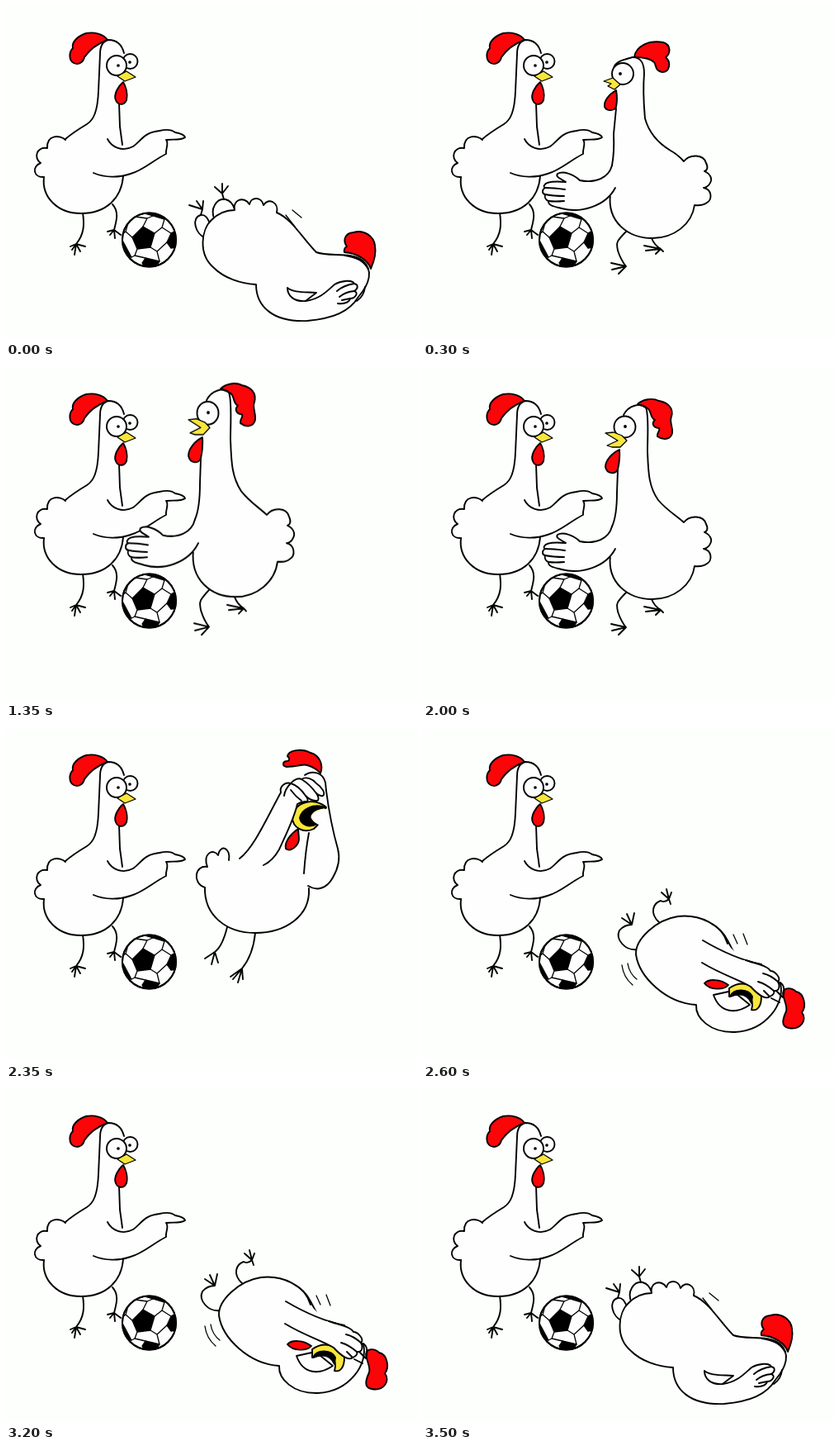
An HTML page without scripts for the animation above (3.55 s loop, 498 px wide and 403 px high).

```html
<!DOCTYPE html>
<html lang="en">
<head>
<meta charset="utf-8">
<title>Chickens and ball</title>
<style>
  html, body { margin: 0; width: 100%; height: 100%; overflow: hidden; background: #fdfffd; }
  svg { display: block; width: 100vw; height: 100vh; }
  path, circle { fill: none; stroke: #000; stroke-width: 1.9; stroke-linecap: round; stroke-linejoin: round; }
  .skin { fill: #fdfefd; }
  .plain { fill: #fdfefd; stroke: none; }
  .red { fill: #fb0509; }
  .yellow { fill: #f8e63c; }
  .black { fill: #000; }
  .thin { stroke-width: 1.3; }

  /* Poses switch like a flipbook */
  .pose { visibility: hidden; animation: 3.55s step-end infinite; }
  .stand { animation-name: stand; }
  .calm { animation-name: calm; }
  .talk { animation-name: talk; }
  .wail { animation-name: wail; }
  .roll-front { animation-name: roll-front; }
  .roll-back { animation-name: roll-back; }
  .stretch { transform-origin: 0 323px; animation: stretch 3.55s step-end infinite; }
  @keyframes stand { 0% { visibility: hidden } 5.63% { visibility: visible } 63.38%, 100% { visibility: hidden } }
  @keyframes calm {
    0% { visibility: hidden } 5.63% { visibility: visible } 35.21% { visibility: hidden }
    43.66% { visibility: visible } 52.11%, 100% { visibility: hidden }
  }
  @keyframes talk {
    0% { visibility: hidden } 35.21% { visibility: visible } 43.66% { visibility: hidden }
    52.11% { visibility: visible } 63.38%, 100% { visibility: hidden }
  }
  @keyframes stretch { 0% { transform: none } 35.21% { transform: scaleY(1.067) } 43.66%, 100% { transform: none } }
  @keyframes wail { 0% { visibility: hidden } 63.38% { visibility: visible } 70.42%, 100% { visibility: hidden } }
  @keyframes roll-front {
    0% { visibility: hidden } 70.42% { visibility: visible } 78.87% { visibility: hidden }
    87.32% { visibility: visible } 95.77%, 100% { visibility: hidden }
  }
  @keyframes roll-back {
    0% { visibility: visible } 5.63% { visibility: hidden } 78.87% { visibility: visible }
    87.32% { visibility: hidden } 95.77%, 100% { visibility: visible }
  }
</style>
</head>
<body>
<svg viewBox="0 0 498 403" preserveAspectRatio="none">
  <defs><clipPath id="round"><circle cx="173.500" cy="283" r="33"/></clipPath></defs>

  <g id="pointer">
    <path d="M93 250C95 264 95 276 85 288L78 291M85 288L80 295M85 288L83 301M85 288L90 297M85 288L96 291"/>
    <path d="M129 240C138 250 133 262 131 271L123 273M131 271L126 277M131 271L132 281M131 271L139 277"/>
    <path class="red" d="M123 41C118 34 107 31 97 33C87 36 79 44 81 51C76 56 76 66 82 69C89 72 94 67 95 62C101 53 110 46 123 41Z"/>
    <path class="plain" d="M114 52C117 40 137 36 143 56L138 117L142 208C140 232 120 251 91 251C62 251 45 228 46 207L72 158C105 143 112 130 112 105Z"/>
    <path d="M143 57C140 45 133 41 124 41C116 43 114 50 114 58L112 103C111 128 106 138 98 143C88 149 80 154 72 161"/>
    <path d="M137 117L138 146L141 168M142 206C140 232 122 251 91 251C62 251 43 231 46 207"/>
    <path class="skin" d="M72 162C66 156 49 155 50 172C37 170 33 184 42 190C31 194 33 208 46 207"/>
    <path class="skin" d="M123 161C128 171 141 177 154 170C164 163 167 153 186 151Q199 148 205 153Q216 155 217 159C212 163 202 161 194 162C198 166 193 173 194 179C178 187 166 199 151 203C137 208 120 208 106 202"/>
    <circle class="skin" cx="150.500" cy="67" r="9"/>
    <circle class="skin" cx="134" cy="72" r="12"/>
    <circle class="black" cx="136" cy="72" r=".9"/>
    <circle class="black" cx="150" cy="68" r=".9"/>
    <path class="yellow thin" d="M135 85L146 79L157 86L144 91Z"/>
    <path class="red" d="M142 92C136 97 130 107 133 114C136 121 143 120 146 114C148 106 145 97 142 92Z"/>
  </g>

  <g class="stretch">
    <g class="pose stand">
      <path d="M248 271C231 288 235 287 236 296Q240 308 246 315L228 311M246 315L229 319M246 315L237 324"/>
      <path d="M277 281Q280 289 288 294L268 290M288 294L270 296M288 294L282 300M288 294L291 297"/>
      <path class="skin" d="M316 188C323 179 340 179 343 190C346 196 344 199 341 200C348 203 351 209 348 214C346 219 341 220 340 220C350 222 351 234 344 238Q339 242 329 241C326 264 304 281 278 281C248 281 223 261 227 228"/>
      <path class="plain" d="M234 120L229 195L227 230L329 240L337 210L316 187L278 155Z"/>
    </g>

    <g class="pose calm">
      <path class="red" d="M256 62C258 48 274 41 291 44C301 47 300 58 294 62C301 68 299 80 290 80C281 79 283 72 280 68C275 63 264 62 256 62Z"/>
      <path class="plain" d="M234 100L230 82C237 65 264 52 268 77L268 135L285 163L316 187L229 195Z"/>
      <path d="M254 62C266 62 268 72 268 82C266 105 268 124 269 136C275 158 290 169 300 175Q309 180 316 188"/>
      <path d="M234 124L231 155Q232 177 229 193"/>
      <path class="skin" d="M231 75C233 67 243 65 254 62"/>
      <circle class="skin" cx="242" cy="82" r="13"/>
      <circle class="black" cx="239" cy="82" r="1"/>
      <path class="yellow thin" d="M219 91L230 87L239 95L232 101L224 97L228 94Z"/>
      <path class="red" d="M234 102C225 107 219 115 220 122C223 128 232 127 234 122Q236 112 234 102Z"/>
    </g>

    <g class="pose talk">
      <path class="red" d="M260 45C266 39 278 37 286 41C297 43 304 50 301 60C298 66 303 72 302 80C300 88 291 89 284 84C283 79 288 77 286 74C278 73 277 68 281 64C275 62 277 53 272 50Z"/>
      <path class="plain" d="M238 100L233 72C237 50 270 37 273 58L273 125L285 157L316 187L229 203Z"/>
      <path d="M243 58C249 46 264 43 270 49C274 58 272 85 272 102C273 126 273 144 285 161C295 173 307 180 316 188"/>
      <path d="M236 125L235 152Q235 180 229 193"/>
      <circle class="skin" cx="244.500" cy="72.500" r="13"/>
      <circle class="black" cx="245" cy="72" r="1"/>
      <path class="yellow thin" d="M221 80L231 79L241 83L247 89L239 97L229 97L223 95L236 89Z"/>
      <path class="red" d="M238 100C229 104 221 113 221 121C223 130 233 130 236 124Q239 111 238 100Z"/>
    </g>

    <g class="pose stand">
      <path class="skin" d="M229 193C225 208 209 215 190 211C183 204 170 199 163 203C160 207 167 209 173 213C161 212 149 212 147 217C146 218 147 220 148 220C144 222 144 227 148 228C147 232 149 235 152 236C151 242 161 243 168 245C190 251 221 243 233 220"/>
      <path d="M148 220Q158 220 172 222M148 228Q158 230 171 230M152 236Q160 237 171 236"/>
    </g>
  </g>

  <g class="pose wail">
    <path d="M268 241C264 257 260 266 253 271L241 279M253 271L249 286M253 271L257 284"/>
    <path d="M302 248C300 268 295 280 286 291L272 301M286 291L275 304M286 291L281 308M286 291L287 304"/>
    <path class="red" d="M381 55C385 45 380 33 369 30C358 24 342 27 341 34C344 37 344 39 341 40C335 40 334 46 340 47C354 47 360 43 365 45C372 47 377 50 381 55Z"/>
    <path class="plain" d="M283 158L334 76L360 55L388 63L404 155L367 195C367 226 335 248 302 248C260 246 237 221 241 193L268 155Z"/>
    <path d="M241 193C240 226 266 248 302 248C338 248 369 228 367 194"/>
    <path class="skin" d="M270 160C273 146 260 139 257 154C251 145 238 152 244 168C229 165 225 188 241 193"/>
    <path d="M362 57C370 51 384 53 387 66L388 76"/>
    <path class="yellow" d="M388 96C374 84 350 88 347 108C347 121 361 128 373 122L379 116Z"/>
    <path class="black" d="M387 96C372 91 358 98 356 109C358 118 368 121 377 116C370 113 367 109 369 105C372 99 379 97 387 96Z"/>
    <path class="plain" d="M388 98C377 98 370 103 370 108C371 112 374 115 379 117L372 130L363 190L383 194L402 158Z"/>
    <path d="M388 76C391 99 396 125 402 146C405 157 403 169 396 181C389 194 377 198 366 191M367 127Q363 148 361 176"/>
    <path class="skin" d="M283 158C300 145 314 113 333 78C331 70 339 65 345 67C349 62 355 60 358 62C364 58 372 62 376 67C382 71 388 79 384 82Q380 83 376 79C380 85 379 89 375 88Q369 88 363 82C367 87 366 90 362 89Q356 90 353 92C349 110 340 127 331 147Q323 161 312 166"/>
    <path d="M345 67Q338 74 337 82M345 67Q355 70 363 82M358 62Q368 68 376 79M345 75Q351 83 358 88"/>
    <path class="red" d="M354 122C345 128 337 138 339 146C345 151 355 142 355 134Z"/>
  </g>

  <g class="pose roll-front">
    <path d="M260 268C244 270 233 255 238 245Q244 238 253 238L241 230M253 238L247 225M253 238L256 224"/>
    <path d="M286 235C274 224 279 212 288 209Q293 212 298 207L289 199M298 207L295 195M298 207L301 199M298 207L300 213"/>
    <path class="red" d="M436 321C437 313 447 314 452 319C462 321 465 337 459 344C466 353 458 366 443 363C433 361 436 352 440 343C442 336 437 330 436 321Z"/>
    <path class="skin" d="M331 335C295 333 262 302 258 274C257 256 282 232 309 228C337 225 360 239 369 257L380 278L433 309C439 332 417 366 378 368C348 369 330 351 331 335Z"/>
    <path class="plain" d="M366 259L340 258L338 284L390 300L412 300L412 284L382 275Z"/>
    <path d="M369 261C365 249 358 241 350 237M339 257C361 270 385 281 410 286"/>
    <path class="red" d="M341 309C346 303 361 304 370 311C365 317 348 318 341 309Z"/>
    <path class="skin" d="M352 323C360 346 380 346 396 335L375 318Z"/>
    <path class="yellow" d="M371 315C387 303 409 313 410 325C410 337 405 343 398 341C402 328 394 316 371 325Z"/>
    <path class="black" d="M372 325C377 314 395 316 399 325L398 333C393 321 382 321 372 325Z"/>
    <path class="skin" d="M338 284C363 299 382 304 397 313C407 324 416 329 420 325Q427 322 425 318C432 319 433 312 430 307C435 303 426 294 421 294C417 287 402 285 391 281"/>
    <path d="M430 307Q421 299 412 297M425 318Q416 310 406 307M420 325L413 318M433 308Q440 313 436 326M436 326L428 318M432 332L422 327"/>
    <path class="thin" d="M241 287Q243 302 254 311M248 285Q250 297 259 304M376 250L381 261M388 249L393 262"/>
  </g>

  <g class="pose roll-back">
    <path class="skin" d="M242 281C229 276 224 256 236 253C243 252 245 259 247 263"/>
    <path class="skin" d="M253 259C246 245 256 232 266 234Q274 236 277 246"/>
    <path d="M236 253L238 246L222 241M238 246L231 236M238 246L239 236M264 234L262 227L253 219M262 227L262 215M262 227L269 218"/>
    <path class="skin" d="M303 337C284 336 264 329 252 317C232 300 237 270 249 259C259 249 269 247 277 247C274 235 288 229 295 240C297 230 310 231 312 241C318 231 331 238 328 250C347 258 359 281 376 298C392 304 418 297 432 308C446 320 440 337 427 352C416 370 397 378 365 381C324 383 303 364 303 337Z"/>
    <path class="red" d="M413 291C408 284 410 275 421 274C434 270 446 279 447 290C449 300 446 309 442 318C439 308 426 299 410 298Q409 293 413 291Z"/>
    <path d="M411 302Q433 305 439 319"/>
    <path class="skin" d="M341 341C348 347 360 346 376 347L363 357C349 358 341 351 341 341Z"/>
    <path class="skin" d="M363 357C380 355 389 345 398 337C407 332 420 331 422 336C427 337 427 342 422 345C428 347 423 354 417 354C416 359 408 361 402 360"/>
    <path d="M422 336Q409 338 401 345M422 345Q411 346 404 352M417 354L407 356M435 340Q434 351 425 357"/>
    <path class="thin" d="M339 253L350 267M347 247L358 256"/>
  </g>

  <g id="ball">
    <circle class="skin" cx="173.500" cy="283" r="32.500"/>
    <g clip-path="url(#round)">
      <path class="black thin" d="M166 267L180 275L175 292L159 294L153 280Z"/>
      <path class="black thin" d="M164 250L189 252L192 258L178 254ZM207 271L200 275L195 286L200 293L207 292ZM165 311L169 305L186 309L180 319L169 318ZM140 282L144 289L152 304L145 302Z"/>
      <path class="thin" d="M153 280L145 273L149 259M166 267L171 257L178 254M180 275L189 268L192 258M189 268L200 275M175 292L183 297L195 286M183 297L186 309M159 294L156 302L169 305M156 302L152 304M145 273L140 277M171 257L157 255"/>
    </g>
    <circle cx="173.500" cy="283" r="32.500"/>
  </g>
</svg>
</body>
</html>
```
